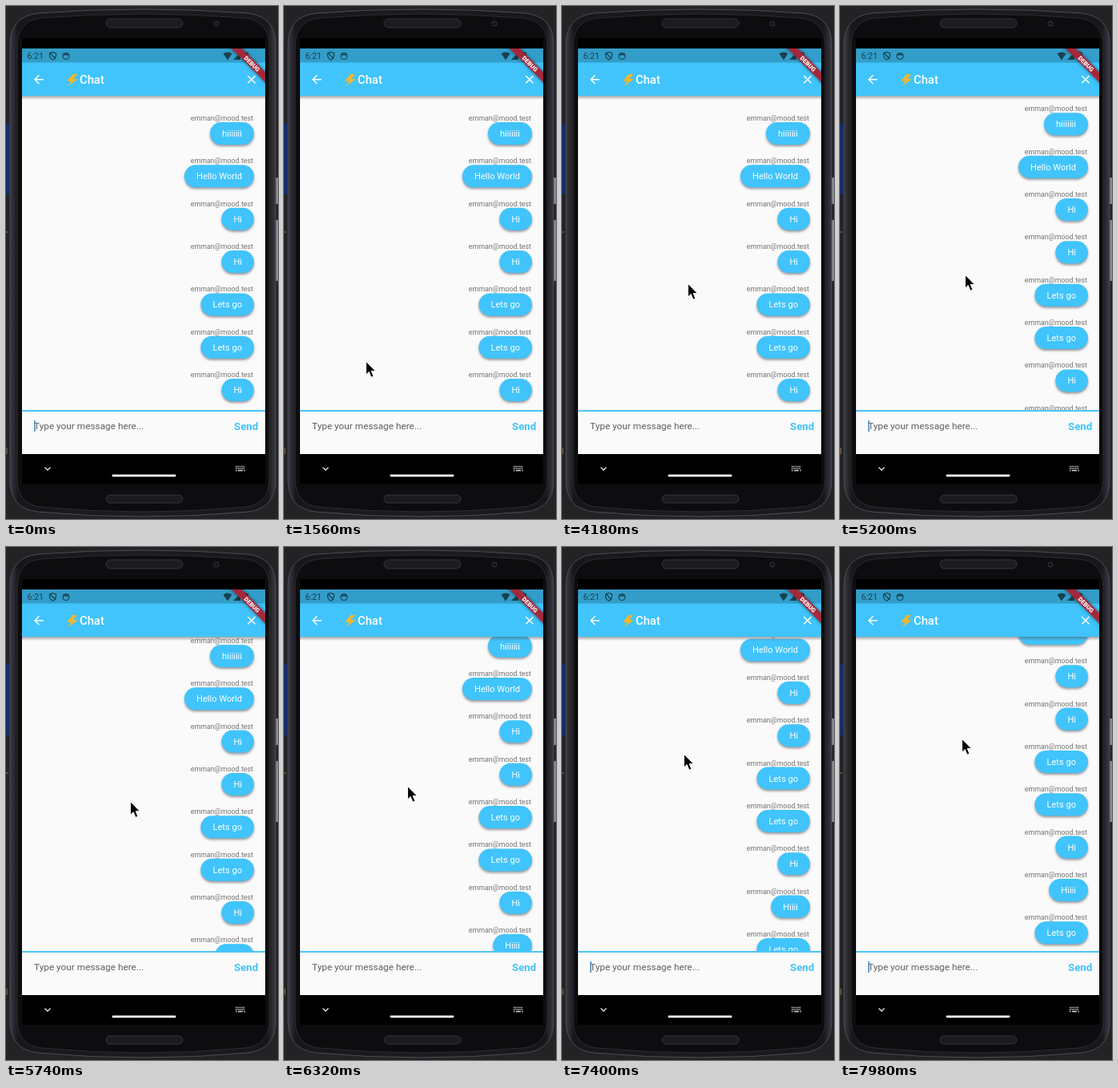
An HTML page that plays this animation: 340x640 px, repeating every 8 s.

```html
<!DOCTYPE html>
<html lang="en">
<head>
<meta charset="utf-8">
<title>Chat</title>
<style>
  html, body { margin: 0; width: 100%; height: 100%; overflow: hidden; background: #232326; }
  svg { display: block; width: 340px; height: 640px; font-family: Roboto, sans-serif; }
  .email { font-size: 8.88px; fill: #737373; text-anchor: end; }
  .message { font-size: 11.1px; fill: #fff; }
  .bubble { fill: #40c4fb; filter: drop-shadow(0 2.4px 1.8px rgba(50, 50, 60, .5)); }
  .banner { fill: #a5283a; filter: drop-shadow(0 0 2px rgba(0, 0, 0, .5)); }
</style>
</head>
<body>
<svg viewBox="0 0 340 640">
  <defs>
    <clipPath id="screenClip"><path d="M20 53H324V559H20z"/></clipPath>
    <clipPath id="listClip"><path d="M20 112H324V504H20z"/></clipPath>
    <linearGradient id="rim">
      <stop offset="0" stop-color="#3a3a42"/><stop offset=".03" stop-color="#17171a"/>
      <stop offset=".5" stop-color="#1d1d21"/>
      <stop offset=".97" stop-color="#17171a"/><stop offset="1" stop-color="#3a3a42"/>
    </linearGradient>
    <linearGradient id="shade" x2="0" y2="1">
      <stop offset="0" stop-color="#50505a" stop-opacity=".5"/>
      <stop offset="1" stop-color="#50505a" stop-opacity="0"/>
    </linearGradient>
  </defs>

  <!-- desktop edges -->
  <path fill="#232326" d="M0 0H340V640H0z"/>
  <path fill="#152c66" d="M0 146H4V235H0z"/>
  <path fill="#5d4a3a" d="M0 281H3V283H0zM0 551H2V559H0z"/>
  <path fill="#8b8b90" d="M337 214H340V247H337zM337 267H340V343H337z"/>

  <!-- phone -->
  <path fill="url(#rim)" stroke="#4c4c55" d="M5 48Q5 13 40 9Q105 4 171 4T302 9Q337 13 337 48V592Q337 627 302 631Q237 637 171 637T40 631Q5 627 5 592z"/>
  <path fill="#0d0d0f" stroke="#2c2c33" d="M14 50Q14 18 44 15Q108 10 171 10T298 15Q329 18 329 50V590Q329 622 298 625Q235 631 171 631T44 625Q14 622 14 590z"/>
  <g fill="#1c1c20" stroke="#35353b">
    <rect x="125" y="16" width="96" height="11" rx="5.5"/>
    <rect x="125" y="610" width="96" height="10" rx="5"/>
    <circle cx="263" cy="22" r="3" fill="#141418"/>
  </g>
  <path d="M20 40H324V596H20z"/>

  <g clip-path="url(#screenClip)">
    <path fill="#fafafa" d="M20 53H324V559H20z"/>
    <g clip-path="url(#listClip)"><g id="list"></g></g>

    <path fill="#4cc5f8" d="M20 504H324V506H20z"/>
    <text x="35" y="528" font-size="11.84" fill="#606060">Type your message here...</text>
    <path id="caret" fill="#3f83b8" d="M35.2 517H36.7V531H35.2z"/>
    <text x="285" y="528.8" font-size="13.3" font-weight="700" fill="#40c4fb">Send</text>

    <!-- app bar -->
    <path fill="url(#shade)" d="M20 112H324V117H20z"/>
    <path fill="#40c4fb" d="M20 70H324V112H20z"/>
    <path fill="#339dc9" d="M20 53H324V70.5H20z"/>
    <g fill="#fff">
      <path transform="translate(32 82.8) scale(.74)" d="M20 11H7.83l5.59-5.59L12 4l-8 8 8 8 1.41-1.41L7.83 13H20z"/>
      <path transform="translate(298 82.8) scale(.74)" d="M19 6.41 17.59 5 12 10.59 6.41 5 5 6.41 10.59 12 5 17.59 6.41 19 12 13.41 17.59 19 19 17.59 13.41 12z"/>
      <text x="92" y="97" font-size="14.8" font-weight="500">Chat</text>
    </g>
    <path fill="#f5b52c" d="M84 84.5 76 93.5 81.5 94 77.5 100 89.5 91.5 84 90.5 89 85.5z"/>

    <!-- status bar -->
    <g fill="#17424f">
      <text x="26.5" y="66" font-size="10.6">6:21</text>
      <path d="M277 67.5 271.5 59.6Q277 55.6 282.5 59.6zM284 67 293 58V67zM296 58h2v-1h3v1h2v9h-7z"/>
      <g fill="none" stroke="#17424f" stroke-width="1.2">
        <path d="M58.5 57.5 62.5 59V62Q62 65.5 58.5 67.2Q55 65.5 54.5 62V59zM55 58.5 62 66"/>
        <circle cx="75" cy="62.5" r="4"/>
        <path stroke-width="2" d="M71.5 60.5H78.5"/>
      </g>
    </g>

    <g transform="translate(307.5 72.1) rotate(45)">
      <path class="banner" d="M-40-4.5H40V4.5H-40z"/>
      <text y="2.7" font-size="7.5" font-weight="900" fill="#fff" text-anchor="middle">DEBUG</text>
    </g>
  </g>

  <!-- navigation bar -->
  <rect x="132.5" y="584.4" width="80" height="2.8" rx="1.4" fill="#fff"/>
  <path fill="none" stroke="#e8e8e8" stroke-width="1.3" d="M48.5 575.5 52 579 55.5 575.5"/>
  <g fill="none" stroke="#d5d5d5" stroke-width="1.4">
    <path stroke-dasharray="1.4 1" d="M287 574.5H299M287 577H299"/>
    <path d="M287 579.5h1.5M290 579.5h6M297.5 579.5h1.5"/>
  </g>

  <path id="pointer" stroke="#fafafa" stroke-linejoin="round" d="M.5.5V17L4.2 13.5 6.9 20.3 9.9 19 7.2 12.5H12.3z"/>
</svg>
<script>
const LOOP = 8000, PITCH = 53.35, BLINK = 667;
const messages = ["hiiiiiii", "Hello World", "Hi", "Hi", "Lets go", "Lets go", "Hi", "Hiiii", "Lets go"];
const byId = id => document.getElementById(id);
const list = byId("list"), pointer = byId("pointer"), caret = byId("caret");

function add(tag, attributes, text = "") {
  const node = document.createElementNS("http://www.w3.org/2000/svg", tag);
  for (const name in attributes) node.setAttribute(name, attributes[name]);
  node.textContent = text;
  list.append(node);
  return node;
}

messages.forEach((message, i) => {
  const y = 159 + i * PITCH;
  add("text", { class: "email", x: 309, y: y - 16 }, "emman@mood.test");
  const bubble = add("rect", { class: "bubble", y: y - 14, height: 28, rx: 14 });
  const label = add("text", { class: "message", y: y + 4 }, message);
  const width = label.getComputedTextLength() + 30;
  bubble.setAttribute("width", width);
  bubble.setAttribute("x", 310 - width);
  label.setAttribute("x", 325 - width);
});

// Keys are [time, ...values]
const pointerPath = [
  [700, -20, 520], [1560, 102, 443], [2500, 157, 346], [4180, 157, 346],
  [5200, 156, 335], [6320, 154, 298], [6880, 152, 275], [7980, 152, 239]
];
const scrollPath = [[4200, 0], [5200, 11.7], [6320, 35.3], [6880, 65.3], [7980, 104.5]];

function sample(keys, time) {
  const next = keys.findIndex(key => key[0] > time);
  if (next === 0) return keys[0].slice(1);
  if (next < 0) return keys.at(-1).slice(1);
  const from = keys[next - 1], to = keys[next];
  const part = (time - from[0]) / (to[0] - from[0]);
  return from.slice(1).map((value, i) => value + (to[i + 1] - value) * part);
}

function draw(now) {
  const time = now % LOOP;
  const [x, y] = sample(pointerPath, time);
  const [scroll] = sample(scrollPath, time);
  pointer.setAttribute("transform", `translate(${x} ${y})`);
  list.setAttribute("transform", `translate(0 ${-scroll})`);
  caret.style.visibility = (time + 240) % BLINK < BLINK / 2 ? "visible" : "hidden";
  requestAnimationFrame(draw);
}
requestAnimationFrame(draw);
</script>
</body>
</html>
```
